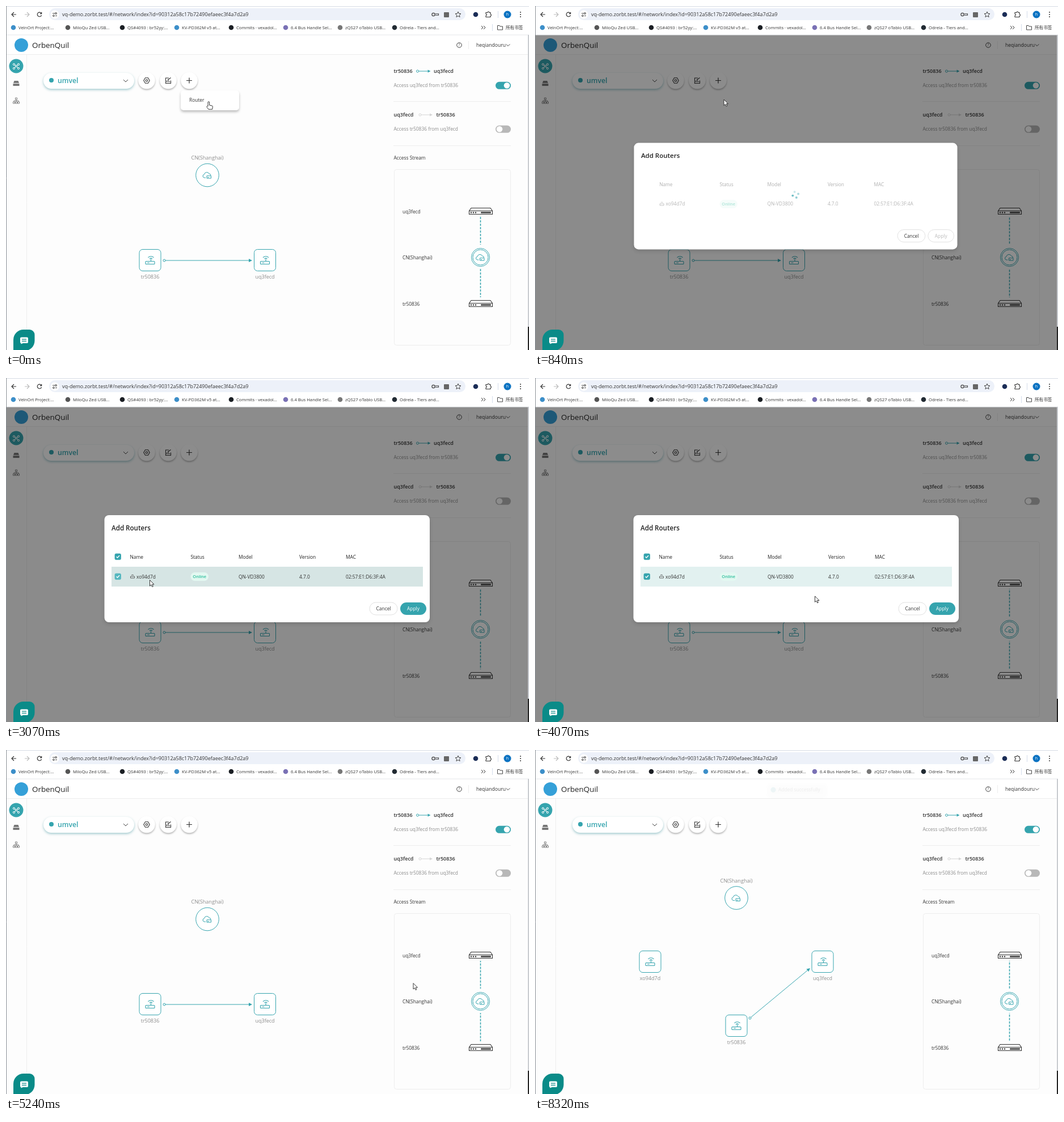
Write an HTML page with a canvas that moves like this. It is 922x607 px and loops after 8.42 s.

```html
<!DOCTYPE html>
<html lang="en">
<head>
<meta charset="utf-8">
<title>Add a router</title>
<style>
  html, body { margin: 0; width: 100%; height: 100%; overflow: hidden; background: #fff; }
  canvas { display: block; }
</style>
</head>
<body>
<canvas width="922" height="607"></canvas>
<script>
const ctx = document.querySelector('canvas').getContext('2d');
const LOOP = 8420, TICK = 140;
const FONT = '"Open Sans","Noto Sans","Noto Sans CJK SC",sans-serif';
const TEAL = '#35a4ae', DARK = '#333', GREY = '#8c8c8c', RULE = '#ededed';
const A = 'tr50836', B = 'uq3fecd', C = 'xo94d7d', CITY = 'CN(Shanghai)';

// y is the optical middle of the line
function text(s, x, y, size = 8.4, color = DARK, weight = 400, align = 'left') {
  ctx.font = `${weight} ${size}px ${FONT}`;
  ctx.textAlign = align;
  ctx.fillStyle = color;
  ctx.fillText(s, x, y + size * 0.36);
}
function paint(fill, stroke, width = 1) {
  if (fill) { ctx.fillStyle = fill; ctx.fill(); }
  if (stroke) { ctx.strokeStyle = stroke; ctx.lineWidth = width; ctx.stroke(); }
}
function box(x, y, w, h, r, fill, stroke, width) {
  ctx.beginPath();
  ctx.roundRect(x, y, w, h, r);
  paint(fill, stroke, width);
}
function dot(x, y, r, fill, stroke, width) {
  ctx.beginPath();
  ctx.arc(x, y, r, 0, 7);
  paint(fill, stroke, width);
}
function line(x1, y1, x2, y2, color, width = 1) {
  ctx.beginPath();
  ctx.moveTo(x1, y1);
  ctx.lineTo(x2, y2);
  paint(null, color, width);
}
function icon(d, x, y, stroke, width = 1, fill) {
  const path = new Path2D(d);
  ctx.save();
  ctx.translate(x, y);
  if (fill) { ctx.fillStyle = fill; ctx.fill(path); }
  if (stroke) { ctx.strokeStyle = stroke; ctx.lineWidth = width; ctx.stroke(path); }
  ctx.restore();
}
function raised(color, dy, blur, draw) {
  ctx.save();
  ctx.shadowColor = color;
  ctx.shadowOffsetY = dy;
  ctx.shadowBlur = blur;
  draw();
  ctx.restore();
}
function arrow(x1, y1, x2, y2, color, size, r) {
  const a = Math.atan2(y2 - y1, x2 - x1);
  line(x1 + r * Math.cos(a), y1 + r * Math.sin(a), x2 - size * Math.cos(a), y2 - size * Math.sin(a), color);
  dot(x1, y1, r, '#fff', color);
  ctx.save();
  ctx.translate(x2, y2);
  ctx.rotate(a);
  icon(`M0 0L${-size} ${-size / 2}V${size / 2}Z`, 0, 0, null, 0, color);
  ctx.restore();
}
const chevron = (x, y, s) => icon(`M${-s} ${-s / 2}L0 ${s / 2}L${s} ${-s / 2}`, x, y, '#444');

function cloud(x, y) {
  icon('M-2 4.5H-4.5A3 3 0 0 1-4.5-1.4A4.6 4.6 0 0 1 4.2-2.4A3 3 0 0 1 7 .6M0 1.2H7.5V5.5H0ZM1.5 4H3.5', x, y, TEAL);
}
function node(name, x, y) {
  box(x - 19, y - 19, 38, 38, 6, '#fff', TEAL);
  icon('M-7 2H7Q8 2 8 3V6Q8 7 7 7H-7Q-8 7-8 6V3Q-8 2-7 2ZM-5 4.5H-1M1.5 2V-2M-1-2.2A3.6 3.6 0 0 1 4-2.2M-3.5-4.6A7 7 0 0 1 6.5-4.6', x, y, TEAL, 1.1);
  text(name, x, y + 29, 9, GREY, 400, 'center');
}
function device(y) {
  icon('M-20.5-.5L-17-5.5H17L20.5-.5M-20.5-.5H20.5V5.5H-20.5Z', 837, y, DARK, 1.1);
  for (const x of [820, 824, 828]) dot(x, y + 2.5, 1.2, DARK);
  box(837, y + 1, 18, 3, 1, '#555');
}

function browser() {
  box(0, 0, 922, 51, 0, '#fff');
  line(0, .5, 922, .5, '#d5dbe3');
  icon('M4 0H-4M0-4L-4 0L0 4', 14, 15, '#333', 1.2);
  icon('M-4 0H4M0-4L4 0L0 4', 37, 15, '#bbb', 1.2);
  icon('M3.3-2A3.8 3.8 0 1 0 3.6 1.2M3.7-4V-1.3H1', 59, 15, '#333', 1.2);
  box(76, 4, 734, 21, 10.5, '#edf1f9');
  dot(86, 15, 7.5, '#fff');
  icon('M-4-2H0M3.5-2H4M-4 2.2H-3M1 2.2H4', 86, 15, '#444', 1.1);
  dot(88, 13, 1.4, '#fff', '#444');
  dot(84, 17.2, 1.4, '#fff', '#444');
  text('vq-demo.zorbt.test/#/network/index?id=90312a58c17b72490efaeec3f4a7d2a9', 99, 15, 9, '#333');
  dot(753.5, 15, 2.6, null, '#444', 1.2);
  icon('M0-1.2H6V1.2H0', 756.5, 15, '#444', 1.1);
  box(772, 11, 9, 9, 1, '#666');
  icon('M0-5L1.4-1.7L5-1.4L2.3 1L3.1 4.5L0 2.6L-3.1 4.5L-2.3 1L-5-1.4L-1.4-1.7Z', 797, 15, '#444');
  dot(828, 15, 4.3, '#1b2d57');
  icon('M-4-3H-1A1.5 1.5 0 0 1 2-3H4V0A1.5 1.5 0 0 1 4 3V5H-4V2.5A1.5 1.5 0 0 0-4-.5Z', 850, 14.5, '#333', 1.1);
  line(867.5, 9, 867.5, 21, '#d5ddeb');
  dot(884, 15, 6.5, '#0c73c2');
  text('h', 884, 14.5, 7, '#fff', 400, 'center');
  for (const y of [11, 15, 19]) dot(907, y, 1, '#333');

  const marks = [
    ['#3d8fc9', 'VelnOrt Project:...'], ['#555', 'MiloQu Zed USB...'],
    ['#1b1f24', 'QS#4093 : br52yy:...'], ['#3d8fc9', 'KV-PD362M v5 at...'],
    ['#1b1f24', 'Commits · vexadol...'], ['#7a71b5', '6.4 Bus Handle Sel...'],
    ['#777', 'zQS27 oTablo USB...'], ['#222b33', 'Odrela - Tiers and...']
  ];
  marks.forEach(([color, label], i) => {
    dot(13 + 96 * i, 38, 4.3, color);
    text(label, 22 + 96 * i, 38, 7.7);
  });
  icon('M-3-3L0 0L-3 3M1-3L4 0L1 3', 841, 38, '#333');
  line(857.5, 32, 857.5, 44, '#d5ddeb');
  icon('M-4.5-3.5H-1L0-2H4.5V4H-4.5Z', 871, 38, '#444');
  text('所有书签', 881, 38, 7.6);
  line(0, 51, 922, 51, '#e4e6ea');
}

function toggle(y, on) {
  box(863, y - 6.5, 27, 13, 6.5, on ? TEAL : '#b8b8b8');
  dot(on ? 883 : 870, y, 5.3, '#fff');
}

function page(t, tick) {
  box(0, 51, 922, 556, 0, '#fdfdfd');
  box(0, 51, 922, 35, 0, '#fff');
  line(0, 85.5, 920, 85.5, RULE);
  line(36.5, 86, 36.5, 607, RULE);
  dot(27, 69, 12, '#35a0d8');
  text('OrbenQuil', 46, 69.5, 13.4, '#222');
  dot(799, 69, 4.3, null, '#444');
  text('?', 799, 69, 6.5, '#444', 400, 'center');
  line(815.5, 62, 815.5, 76, RULE);
  text('heqiandouru', 829, 69, 8.6);
  chevron(885, 69, 3.3);

  dot(18, 106, 12.5, TEAL);
  icon('M-4-3L0 0L4-3M-4 4L0 0L4 4', 18, 106, '#fff');
  for (const [x, y] of [[-4, -3], [4, -3], [0, 0], [-4, 4], [4, 4]]) dot(18 + x, 106 + y, 1.6, TEAL, '#fff');
  icon('M-5 0L-3.5-4H3.5L5 0ZM-5.5 1H5.5V5H-5.5Z', 18, 136, null, 0, '#777');
  icon('M-1.5-5H1.5V-2H-1.5ZM0-2V2M-4 2V0H4V2M-5.5 2H-2.5V5H-5.5ZM-1.5 2H1.5V5H-1.5ZM2.5 2H5.5V5H2.5Z', 18, 167, '#777', .9);

  raised('rgba(53,140,150,.45)', 2, 4, () => box(66, 118, 160, 28, 14, '#fff'));
  dot(80, 131, 4, TEAL);
  text('umvel', 91, 131.5, 12.2, TEAL, 600);
  chevron(211, 132, 4);
  for (const x of [248, 286, 323])
    raised('rgba(0,0,0,.28)', 2, 3, () => dot(x, 131.5, 14.8, '#fff'));
  icon('M-2.5-4.8H2.5L5.2 0L2.5 4.8H-2.5L-5.2 0Z', 248, 131.5, '#333', 1.1);
  dot(248, 131.5, 1.8, null, '#333', 1.1);
  icon('M1-4.5H-4.5V5H4.5V0M-2.5 3V0M0 3V-1.5M2.3 3V1M-1-1L4.5-5', 286, 131.5, '#333', 1.1);
  icon('M-5 0H5M0-5V5', 323, 131.5, '#333', 1.2);

  const three = t >= 6060, cy = three ? 261 : 298.5;
  text(CITY, 355, cy - 30.5, 9.1, GREY, 400, 'center');
  dot(355, cy, 20.3, '#fff', TEAL);
  cloud(354, cy);
  if (three) {
    arrow(379, 473, 485, 385, TEAL, 6, 2);
    node(C, 203, 373.5);
    node(B, 507, 373.5);
    node(A, 355, 486.5);
  } else {
    arrow(279, 449, 434, 449, TEAL, 6, 2);
    node(A, 254, 448.5);
    node(B, 456.5, 448.5);
  }

  text(A, 683.5, 115, 9, DARK, 600);
  arrow(725.5, 115, 748.5, 115, TEAL, 5, 2);
  text(B, 754, 115, 9, DARK, 600);
  text(`Access ${B} from ${A}`, 683.5, 140, 8.4, GREY);
  toggle(140.3, true);
  line(683, 168.5, 890, 168.5, RULE);
  text(B, 683.5, 192, 9, DARK, 600);
  arrow(730, 192, 752, 192, '#d5d5d5', 5, 2);
  text(A, 758.5, 192, 9, DARK, 600);
  text(`Access ${A} from ${B}`, 683.5, 217, 8.4, GREY);
  toggle(217.3, false);
  line(683, 246.5, 890, 246.5, RULE);
  text('Access Stream', 683.5, 268);

  box(684.5, 288.5, 205, 310, 4, null, RULE);
  text(B, 699, 362.5);
  text(CITY, 699, 444);
  text(A, 699, 525.5);
  ctx.save();
  ctx.setLineDash([4, 2]);
  ctx.lineDashOffset = tick / 50;
  line(836.5, 372, 836.5, 421, TEAL, 1.5);
  line(836.5, 464, 836.5, 514, TEAL, 1.5);
  ctx.restore();
  device(362);
  device(525);
  dot(836.5, 443.5, 16, '#fff', TEAL);
  dot(836.5, 443.5, 13.6, null, TEAL);
  cloud(835.5, 443.5);
}

function menu() {
  raised('rgba(0,0,0,.25)', 3, 4, () => box(308, 149, 103, 35, 5, '#fff'));
  text('Router', 323, 166);
}

function checkbox(y, on, color) {
  box(192, y - 5.2, 10.5, 10.5, 2, on ? color : '#fff', on ? color : '#d9d9d9', .8);
  if (on) icon('M-2.6 0L-.7 2L2.8-2', 197.2, y, '#fff', 1.4);
}
function button(label, x, w, y, fill, edge, color) {
  box(x, y - 11, w, 22, 11, fill, edge, .8);
  text(label, x + w / 2, y, 8.4, color, 400, 'center');
}

function dialog(t, tick, pointer) {
  const empty = t < 840, busy = t < 1120, checked = t >= 2620;
  const scale = empty ? .85 : t < 970 ? .994 : 1;
  const top = empty ? 212 : 242, bottom = empty ? 471 : 431;
  const columns = empty ? [219, 322, 427, 535, 652] : [218.5, 325.5, 410, 517, 599];
  const hover = pointer.y > 333 && pointer.y < 368;
  ctx.save();
  // grows out of the clicked menu entry
  ctx.translate(333, 170);
  ctx.scale(scale, scale);
  ctx.translate(-333, -170);
  ctx.globalAlpha = empty ? .92 : 1;
  raised('rgba(0,0,0,.15)', 3, 6, () => box(173.5, top, 573.5, bottom - top, 8, '#fff'));
  text('Add Routers', 186, top + 22.5, 11.6, '#222', 600);

  ctx.globalAlpha = empty ? .3 : busy ? .36 : 1;
  ['Name', 'Status', 'Model', 'Version', 'MAC'].forEach((s, i) => text(s, columns[i], top + 73.5, 8.4, '#222', 500));
  if (!empty) {
    if (checked || hover) box(186, 333, 549, 35, 0, !checked ? '#f4f8f8' : hover ? '#d6e5e4' : '#e2f1f0');
    if (!busy) {
      checkbox(315.3, checked, TEAL);
      checkbox(350.3, checked, t < 3490 ? '#55b7bf' : TEAL);
    }
    icon('M-3.5 0H3.5V3H-3.5ZM-2-2A3 3 0 0 1 2-2', 223, 350, '#555', .9);
    text(C, 230, 350.5);
    box(325.5, 343, 31.5, 15, 7.5, '#e3f8f1');
    text('Online', 341.2, 350.5, 7.5, '#2bbd9b', 600, 'center');
    text('QN-VD3800', 410, 350.5);
    text('4.7.0', 517, 350.5);
    text('02:57:E1:D6:3F:4A', 599, 350.5);
  }
  ctx.globalAlpha = 1;
  if (busy) {
    const mid = empty ? 339 : 334;
    for (let i = 0; i < 4; i++) {
      const a = tick / 1200 * 2 * Math.PI + i * Math.PI / 2;
      ctx.globalAlpha = .25 + i * .15;
      dot(460 + 5.2 * Math.cos(a), mid + 5.2 * Math.sin(a), 2, TEAL);
    }
    ctx.globalAlpha = 1;
  }
  button('Cancel', 641, 49, bottom - 24, '#fff', empty ? '#f4f4f4' : '#d9d9d9', DARK);
  if (checked) button('Apply', 695, 46, 407, pointer.x > 695 && pointer.y > 396 ? '#56b9c0' : TEAL, null, '#fff');
  else button('Apply', 695, 46, bottom - 24, '#fff', empty ? '#f4f4f4' : '#d9d9d9', '#bbb');
  ctx.restore();
}

function toast(t) {
  const gone = Math.max(0, Math.min(1, (t - 7960) / 390));
  ctx.save();
  ctx.globalAlpha = 1 - gone;
  ctx.translate(0, -2 * gone);
  raised('rgba(0,0,0,.15)', 2, 6, () => box(409, 59, 106, 26, 5, '#fff'));
  dot(420, 72, 4.6, TEAL);
  icon('M-2 0L-.5 1.6L2.2-1.5', 420, 72, '#fff', 1.1);
  text('Added successfully', 429, 72);
  ctx.restore();
}

function chat() {
  box(13, 571, 37.5, 37.5, [18, 9, 18, 0], '#0a8b88');
  icon('M-5-5.5H5Q7-5.5 7-3.5V3Q7 5 5 5H-2L-5.5 6.5V5Q-7 5-7 3V-3.5Q-7-5.5-5-5.5Z', 32, 590, null, 0, '#fff');
  icon('M-4-1.8H4M-4 1.4H4', 32, 590, '#0a8b88', 1.3);
}

const route = [
  [0, 357, 169], [150, 357, 169], [480, 333, 165], [970, 333, 165], [1270, 322, 205],
  [2220, 197, 316], [2450, 197, 350], [2700, 197, 350], [2930, 253.5, 356.5],
  [3600, 253.5, 356.5], [4500, 718, 411.5], [5790, 718, 411.5], [6500, 700, 622]
];
function pointerAt(t) {
  const next = route.findIndex(k => k[0] > t);
  if (next < 0) return { x: 700, y: 622 };
  const [t0, x0, y0] = route[next - 1], [t1, x1, y1] = route[next];
  const p = (t - t0) / (t1 - t0), e = p * p * (3 - 2 * p);
  return { x: x0 + (x1 - x0) * e, y: y0 + (y1 - y0) * e };
}
function drawPointer({ x, y }, hand) {
  if (hand) icon('M-1 1A1.3 1.3 0 0 1 1.6 1V6L6.1 7A1.7 1.7 0 0 1 7.4 8.8L6.6 13.3H0L-3 9.3A1.2 1.2 0 0 1-1 8Z', x, y, '#222', .9, '#fff');
  else icon('M0 0V10.5L2.4 8.3L4.2 12L5.9 11.2L4.2 7.6H7.5Z', x, y, '#222', .9, '#fff');
}

function draw(t) {
  const tick = Math.floor(t / TICK + .01) * TICK;
  const pointer = pointerAt(tick), open = t >= 700 && t < 5240;
  page(t, tick);
  if (t >= 5370) toast(t);
  if (open) box(0, 51, 920, 556, 0, `rgba(0,0,0,${t < 840 ? .16 : .45})`);
  if (t < 840) menu();
  if (open) dialog(t, tick, pointer);
  browser();
  chat();
  line(.5, 0, .5, 607, '#8a8f96');
  line(921, 51, 921, 607, '#c9ccd0', 2);
  line(921, 566, 921, 607, '#222', 2);
  drawPointer(pointer, t < 560 || (t >= 2300 && t < 2800));
}

const start = performance.now();
function loop() {
  draw((performance.now() - start) % LOOP);
  requestAnimationFrame(loop);
}
loop();
</script>
</body>
</html>
```
